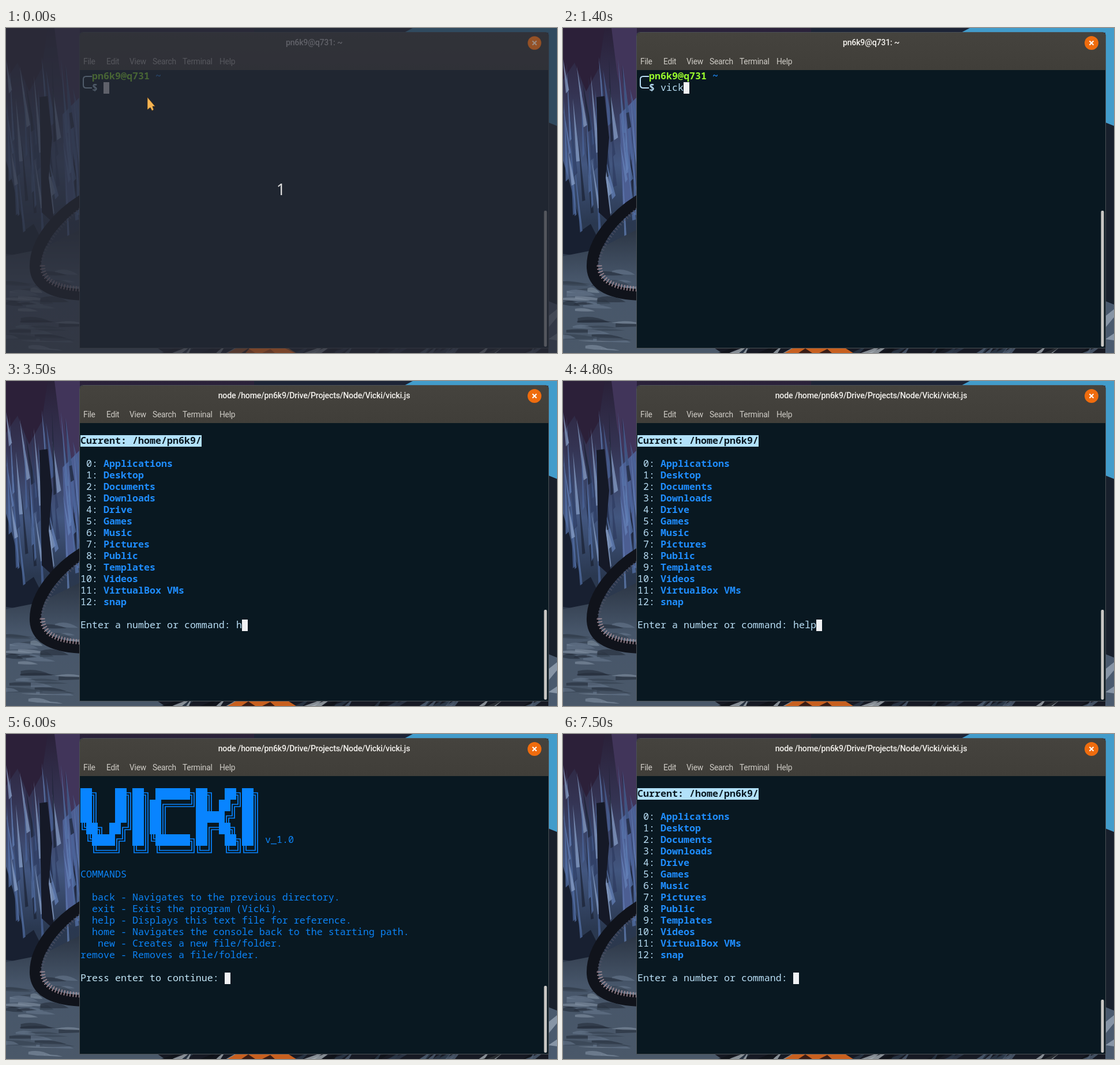
These frames come from a looping animation (955 px wide and 564 px high, 8 s). An HTML page:

```html
<!DOCTYPE html>
<html lang="en">
<head>
<meta charset="utf-8">
<title>Terminal session</title>
<style>
html, body { margin: 0; width: 100%; height: 100%; overflow: hidden; background: #15161f; }
svg { display: block; width: 955px; height: 564px; }
text { white-space: pre; }
.mono { font: 16.6667px "Noto Sans Mono", "DejaVu Sans Mono", monospace; }
.bold { font-weight: 700; }
.menu { font: 13.8px Roboto, "Noto Sans", sans-serif; letter-spacing: -.25px; fill: #cfccc6; }
.title { font: 500 14.2px Roboto, "Noto Sans", sans-serif; letter-spacing: -.22px; fill: #f4f2ee; text-anchor: middle; }
.count { font: 27px "Noto Sans", "Open Sans", sans-serif; fill: #dcdcdc; text-anchor: middle; }
</style>
</head>
<body>
<svg id="stage" viewBox="0 0 955 564" xmlns="http://www.w3.org/2000/svg">
  <defs>
    <linearGradient id="sky" x2="0" y2="1">
      <stop offset="0" stop-color="#2a2139"/>
      <stop offset=".2" stop-color="#343352"/>
      <stop offset=".42" stop-color="#42567f"/>
      <stop offset=".6" stop-color="#2a3850"/>
      <stop offset=".75" stop-color="#2f3a4a"/>
      <stop offset="1" stop-color="#3c495a"/>
    </linearGradient>
    <linearGradient id="soil" x2="0" y2="1">
      <stop offset="0" stop-color="#2c3645"/>
      <stop offset=".4" stop-color="#47566a"/>
      <stop offset="1" stop-color="#4a5869"/>
    </linearGradient>
    <linearGradient id="bar" x2="0" y2="1">
      <stop offset="0" stop-color="#45433e"/>
      <stop offset="1" stop-color="#403e39"/>
    </linearGradient>
    <clipPath id="left"><rect width="128" height="564"/></clipPath>
  </defs>

  <g id="wall">
    <rect width="955" height="564" fill="url(#sky)"/>
    <path d="M430 0H705L690 8H430Z" fill="#1d2436"/>
    <path d="M705 0H955V170L940 164V8H690Z" fill="#429ccb"/>
    <path d="M940 164L955 170V480L940 474Z" fill="#18202c"/>
    <path d="M940 474L955 480V564H940Z" fill="#4a5a6e"/>
    <path d="M940 500L955 488V502L940 520ZM940 540L955 530V542Z" fill="#8795a6"/>
    <g clip-path="url(#left)">
      <path d="M0 0H72L62 70 40 110 20 60 0 90Z" fill="#2c2039"/>
      <path d="M84 0H128V130L112 160 94 80Z" fill="#41355a"/>
      <path d="M98 150L128 120V290L104 312Z" fill="#4c5e92"/>
      <path d="M0 230L12 270 22 310 34 350 48 340 64 372 90 340 60 400 0 392Z" fill="#182031"/>
      <g id="shards"></g>
      <path d="M58 120L72 118 80 190 74 260 84 340 62 320Z" fill="#151927"/>
      <path d="M0 396L60 384 128 350V564H0Z" fill="url(#soil)"/>
      <g id="ground"></g>
      <path d="M132 299C95 322 49 368 51 416C53 450 88 461 132 463" fill="none" stroke="#10131b" stroke-width="20"/>
      <path d="M132 311C104 332 63 376 62 412" fill="none" stroke="#4d5064" stroke-width="5" stroke-dasharray="1.4 4"/>
      <path d="M63 412C64 440 90 451 132 453" fill="none" stroke="#a58d97" stroke-width="9" stroke-dasharray="1.6 3.6"/>
    </g>
    <rect x="128" y="555" width="812" height="9" fill="#171a24"/>
    <path d="M128 555H262L275 564H128Z" fill="#4a5869"/>
    <g id="floor"></g>
    <path d="M384 564L398 556H490L503 564Z" fill="#c8601f"/>
    <path d="M408 564L420 556 432 564ZM444 564L458 557 466 564Z" fill="#3a1c14"/>
  </g>

  <g id="window">
    <path d="M127.5 555.5V14Q127.5 7.5 134 7.5H934Q940.5 7.5 940.5 14V555.5Z" fill="#091821" stroke="#4b5155"/>
    <path d="M128 73V14Q128 8 134 8H934Q940 8 940 14V73Z" fill="url(#bar)"/>
    <text class="title" id="title" x="534" y="30"></text>
    <g id="menu"></g>
    <circle cx="916" cy="26" r="12" fill="#ef6c0e"/>
    <path d="M912.5 22.5l7 7m0-7l-7 7" stroke="#fff" stroke-width="2"/>
    <rect id="thumb" x="932.5" width="5" rx="2" fill="#c9c7c4"/>
    <g id="shell"></g>
    <g id="list"></g>
    <g id="help"></g>
    <text class="mono" id="input" fill="#b9def5"></text>
    <rect id="caret" width="10" height="20" fill="#f0f1f4"/>
  </g>

  <path id="beam" d="M241 109.5H244L245 110.5 246 109.5H249M245 110V128M241 129H244L245 128 246 129H249" fill="none" stroke="#f2a148" stroke-width="2"/>

  <g id="intro">
    <rect width="955" height="564" fill="#2a2c37" opacity=".73"/>
    <circle cx="916" cy="26" r="11.5" fill="#d86a20" opacity=".45"/>
    <path d="M912.5 22.5l7 7m0-7l-7 7" stroke="#9a8a80" stroke-width="2"/>
    <path d="M415 564L422 556H484L500 564Z" fill="#c05a20" opacity=".35"/>
    <path d="M245 120V142L250 138 253 143.500 256 142 254 136H258.500Z" fill="#f6b452" stroke="#3a2a18" stroke-width=".7"/>
    <text class="count" x="476.500" y="290">1</text>
  </g>
</svg>

<script>
const LOOP = 8000, LEFT = 129, TOP = 74, CELL = 10, LINE = 20;
const USER = "pn6k9", HOST = "q731";
const ICE = "#b9def5", BLUE = "#1f8dff", AZURE = "#0c83f6";
const $ = id => document.getElementById(id);
const colX = c => LEFT + c * CELL;
const rowY = r => TOP + r * LINE;

function add(parent, tag, attrs, content) {
  const el = document.createElementNS("http://www.w3.org/2000/svg", tag);
  for (const k in attrs) el.setAttribute(k, attrs[k]);
  if (content) el.textContent = content;
  $(parent).appendChild(el);
}

function put(parent, col, row, str, fill, bold) {
  const lead = str.length - str.trimStart().length;
  add(parent, "text", {
    class: bold ? "mono bold" : "mono", x: colX(col + lead), y: rowY(row) + 15, fill
  }, str.trim());
}

function show(id, on) { $(id).style.display = on ? "" : "none"; }

// Rock streaks, ground strokes and the strip below the window
let seed = 11;
const rand = () => (seed = (seed * 16807) % 2147483647) / 2147483647;

function streaks(parent, count, tones, opacity, shape) {
  for (let i = 0; i < count; i++) {
    add(parent, "path", { d: shape(), fill: tones[i % tones.length], opacity });
  }
}

streaks("shards", 60, ["#6584bb", "#4a669c", "#8ba3ca", "#1b2133", "#2d3b60", "#5674ab"], .7, () => {
  const x = rand() * 122, y = 50 + rand() * 190, h = 50 + rand() * 100, w = 2 + rand() * 4;
  return `M${x} ${y}l${w + 3 + rand() * 10} ${h}l${-w - 1} ${8 * rand()}Z`;
});
streaks("ground", 44, ["#66778c", "#232c39", "#8292a3", "#34404f"], .6, () => {
  const x = rand() * 130 - 30, y = 415 + rand() * 145, w = 20 + rand() * 45;
  return `M${x} ${y}q${w / 2} ${-8 * rand()} ${w} ${rand() * 8}q${-w / 2} 1 ${-w} ${2 - rand() * 6}Z`;
});
streaks("floor", 40, ["#4e5d70", "#a3aab0", "#2c3849", "#101319"], .8, () => {
  const x = 265 + rand() * 660, w = 5 + rand() * 22;
  return `M${x} 564L${x + w} 556h${w / 3}l${-w / 2} 8Z`;
});

// Menu
[["File", 134], ["Edit", 174], ["View", 214], ["Search", 254], ["Terminal", 306], ["Help", 370]]
  .forEach(([name, x]) => add("menu", "text", { class: "menu", x, y: 63 }, name));

// Shell prompt
add("shell", "path", {
  d: "M149 84H139Q134 84 134 89V99Q134 104 139 104H149",
  fill: "none", stroke: ICE, "stroke-width": 2
});
put("shell", 2, 0, `${USER}@${HOST}`, "#98fb2c", true);
put("shell", 13, 0, "~", BLUE, true);
put("shell", 2, 1, "$", ICE, true);

// Directory list
add("list", "rect", { x: LEFT, y: rowY(1), width: 210, height: LINE, fill: "#b2e1fa" });
put("list", 0, 1, `Current: /home/${USER}/`, "#091821", true);
["Applications", "Desktop", "Documents", "Downloads", "Drive", "Games", "Music", "Pictures",
  "Public", "Templates", "Videos", "VirtualBox VMs", "snap"].forEach((name, i) => {
  put("list", 0, 3 + i, `${i}:`.padStart(3), ICE);
  put("list", 4, 3 + i, name, BLUE, true);
});
put("list", 0, 17, "Enter a number or command:", ICE);

// Banner made of blocks and double rules
const rules = {
  "╗": "M0 8H7V20M0 12H3V20", "╔": "M10 8H3V20M10 12H7V20",
  "╝": "M0 12H7V0M0 8H3V0", "╚": "M10 12H3V0M10 8H7V0",
  "║": "M3 0V20M7 0V20", "═": "M0 8H10M0 12H10"
};
[
  "██╗   ██╗██╗ ██████╗██╗  ██╗██╗",
  "██║   ██║██║██╔════╝██║ ██╔╝██║",
  "██║   ██║██║██║     █████╔╝ ██║",
  "╚██╗ ██╔╝██║██║     ██╔═██╗ ██║",
  " ╚████╔╝ ██║╚██████╗██║  ██╗██║",
  "  ╚═══╝  ╚═╝ ╚═════╝╚═╝  ╚═╝╚═╝"
].forEach((line, r) => [...line].forEach((ch, c) => {
  const x = colX(c), y = rowY(r + 1);
  if (ch === "█") {
    add("help", "rect", { x, y, width: CELL, height: LINE, fill: "#0884ff", "shape-rendering": "crispEdges" });
  } else if (rules[ch]) {
    add("help", "path", {
      d: rules[ch], transform: `translate(${x} ${y})`,
      fill: "none", stroke: "#0884ff", "stroke-width": 1.7
    });
  }
}));
put("help", 32, 5, "v_1.0", AZURE);
put("help", 0, 8, "COMMANDS", AZURE);
[
  ["back", "Navigates to the previous directory."],
  ["exit", "Exits the program (Vicki)."],
  ["help", "Displays this text file for reference."],
  ["home", "Navigates the console back to the starting path."],
  ["new", "Creates a new file/folder."],
  ["remove", "Removes a file/folder."]
].forEach(([cmd, info], i) => put("help", 0, 10 + i, `${cmd.padStart(6)} - ${info}`, AZURE));
put("help", 0, 17, "Press enter to continue:", "#c3e6f7");

// Timeline: [time, value] steps, the last one reached applies
const at = (steps, t) => steps.reduce((v, [time, next]) => t >= time ? next : v, steps[0][1]);
const screens = [[0, "shell"], [2200, "list"], [5000, "help"], [7400, "list"]];
const thumbTop = [[0, 317], [2200, 397], [5000, 437], [7400, 461]];
const shellKeys = [[0, 0], [1000, 1], [1200, 2], [1400, 4], [1900, 5]];
const listKeys = [[0, 0], [3500, 1], [3800, 3], [4300, 4], [5000, 0]];
const caretOff = [[1900, 2200], [3000, 3100], [4700, 4800], [5400, 6000], [6600, 7200]];
const entry = { shell: [4, 1], list: [27, 17], help: [25, 17] };

function draw(t) {
  const screen = at(screens, t);
  const [col, row] = entry[screen];
  const typed = screen === "shell" ? "vicki".slice(0, at(shellKeys, t))
    : screen === "list" ? "help".slice(0, at(listKeys, t)) : "";

  Object.keys(entry).forEach(id => show(id, id === screen));
  $("title").textContent = t < 1900 ? `${USER}@${HOST}: ~`
    : `node /home/${USER}/Drive/Projects/Node/Vicki/vicki.js`;

  const y = at(thumbTop, t);
  $("thumb").setAttribute("y", y);
  $("thumb").setAttribute("height", 553 - y);

  $("input").textContent = typed;
  $("input").setAttribute("x", colX(col));
  $("input").setAttribute("y", rowY(row) + 15);
  $("caret").setAttribute("x", colX(col + typed.length));
  $("caret").setAttribute("y", rowY(row));
  show("caret", !caretOff.some(([from, to]) => t >= from && t < to));

  show("intro", t < 500);
  show("beam", t >= 500 && t < 700);
}

const start = performance.now();
function tick() {
  draw((performance.now() - start) % LOOP);
  requestAnimationFrame(tick);
}
tick();
</script>
</body>
</html>
```
